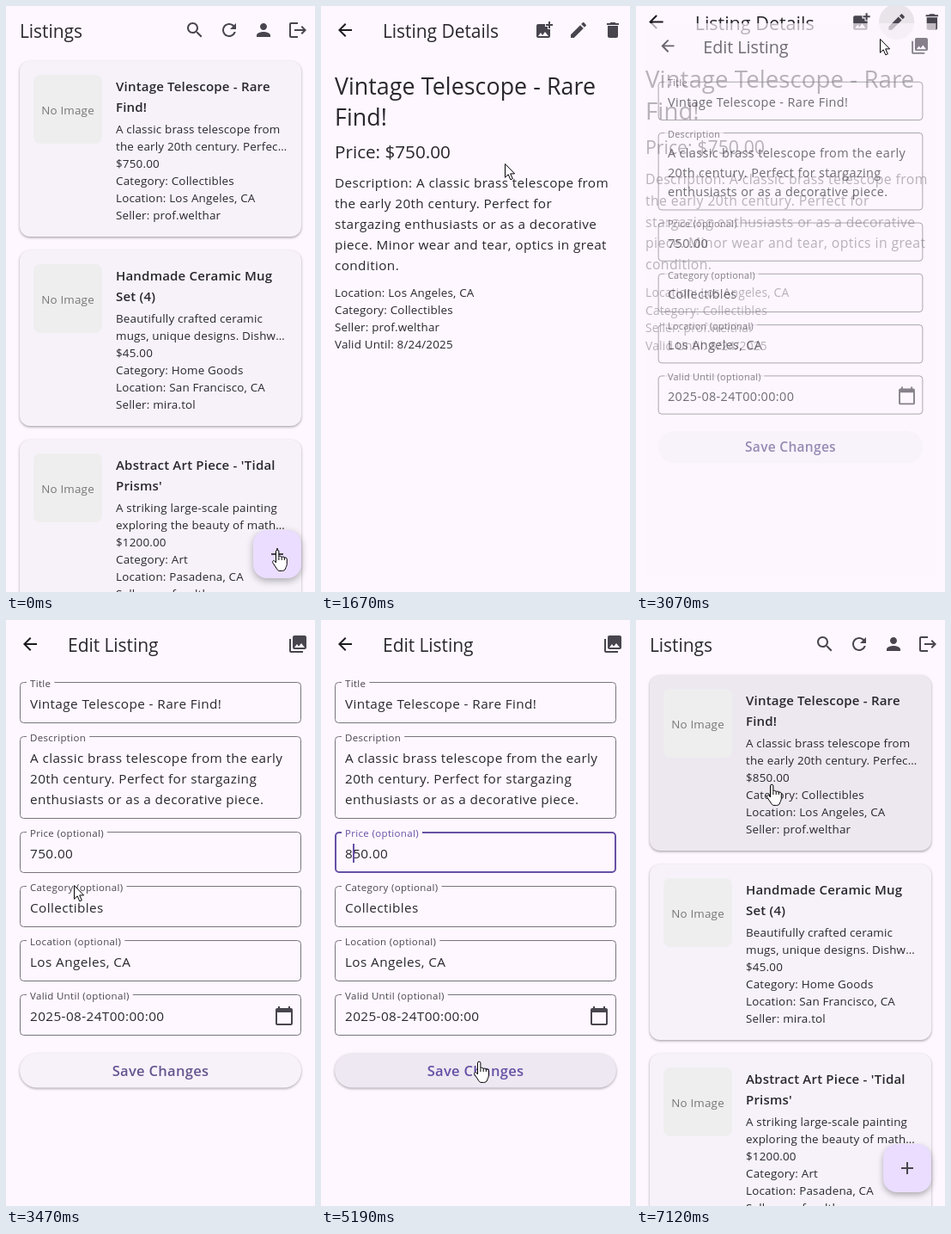
Recreate the animation shown at these times as an HTML page with a canvas. Size 360 by 681 pixels, loop 7390 ms.

```html
<!DOCTYPE html>
<html lang="en">
<head>
<meta charset="utf-8">
<title>Listings app</title>
<style>
html, body { margin: 0; width: 100%; height: 100%; overflow: hidden; background: #fef7ff; }
canvas { display: block; width: 360px; height: 681px; }
</style>
</head>
<body>
<canvas id="stage"></canvas>
<script>
const W = 360, H = 681, LOOP = 7390, STEP = LOOP / 111;
const canvas = document.getElementById('stage');
const ctx = canvas.getContext('2d');
const dpr = window.devicePixelRatio || 1;
canvas.width = W * dpr;
canvas.height = H * dpr;

const C = {
  bg: '#fef7ff', card: '#f7f2fa', hover: '#ede8f0', ink: '#1d1b20', text: '#29272c', icon: '#49454f',
  line: '#79747e', primary: '#6750a4', muted: '#65558f', fab: '#eaddff'
};

// weight, size, letter spacing
const FONT = {
  headline: [400, 26.8, 0.06], title: [400, 21, -0.05], price: [400, 20.7, 0],
  cardTitle: [600, 15, 0.2], large: [400, 15.3, 0.4], body: [400, 13.4, 0.19],
  label: [400, 11.5, 0.34], button: [600, 16.5, 0.3]
};

const ICON = Object.fromEntries(Object.entries({
  search: 'M15.5 14h-.79l-.28-.27C15.41 12.59 16 11.11 16 9.5 16 5.91 13.09 3 9.5 3S3 5.91 3 9.5 5.91 16 9.5 16c1.61 0 3.09-.59 4.23-1.57l.27.28v.79l5 4.99L20.49 19l-4.99-5zm-6 0C7.01 14 5 11.99 5 9.5S7.01 5 9.5 5 14 7.01 14 9.5 11.99 14 9.5 14z',
  refresh: 'M17.65 6.35C16.2 4.9 14.21 4 12 4c-4.42 0-7.99 3.58-7.99 8s3.57 8 7.99 8c3.73 0 6.84-2.55 7.73-6h-2.08c-.82 2.33-3.04 4-5.65 4-3.31 0-6-2.69-6-6s2.69-6 6-6c1.66 0 3.14.69 4.22 1.78L13 11h7V4l-2.35 2.35z',
  person: 'M12 12c2.21 0 4-1.79 4-4s-1.79-4-4-4-4 1.79-4 4 1.79 4 4 4zm0 2c-2.67 0-8 1.34-8 4v2h16v-2c0-2.66-5.33-4-8-4z',
  logout: 'M17 7l-1.41 1.41L18.17 11H8v2h10.17l-2.58 2.58L17 17l5-5zM4 5h8V3H4c-1.1 0-2 .9-2 2v14c0 1.1.9 2 2 2h8v-2H4V5z',
  back: 'M20 11H7.83l5.59-5.59L12 4l-8 8 8 8 1.41-1.41L7.83 13H20v-2z',
  addPhoto: 'M19 7v2.99s-1.99.01-2 0V7h-3s.01-1.99 0-2h3V2h2v3h3v2h-3zm-3 4V8h-3V5H5c-1.1 0-2 .9-2 2v12c0 1.1.9 2 2 2h12c1.1 0 2-.9 2-2v-8h-3zM5 19l3-4 2 3 3-4 4 5H5z',
  edit: 'M3 17.25V21h3.75L17.81 9.94l-3.75-3.75L3 17.25zM20.71 7.04c.39-.39.39-1.02 0-1.41l-2.34-2.34c-.39-.39-1.02-.39-1.41 0l-1.83 1.83 3.75 3.75 1.83-1.83z',
  trash: 'M6 19c0 1.1.9 2 2 2h8c1.1 0 2-.9 2-2V7H6v12zM19 4h-3.5l-1-1h-5l-1 1H5v2h14V4z',
  photos: 'M22 16V4c0-1.1-.9-2-2-2H8c-1.1 0-2 .9-2 2v12c0 1.1.9 2 2 2h12c1.1 0 2-.9 2-2zm-11-4l2.03 2.71L16 11l4 5H8l3-4zM2 6v14c0 1.1.9 2 2 2h14v-2H4V6H2z',
  calendar: 'M20 3h-1V1h-2v2H7V1H5v2H4c-1.1 0-2 .9-2 2v16c0 1.1.9 2 2 2h16c1.1 0 2-.9 2-2V5c0-1.1-.9-2-2-2zm0 18H4V8h16v13z',
  add: 'M19 13h-6v6h-2v-6H5v-2h6V5h2v6h6v2z'
}).map(([name, d]) => [name, new Path2D(d)]));

// Pointer shapes, drawn with the hot spot at the origin
const POINTER = {
  arrow: new Path2D('M.5 .5V16.3l3.7-3.5 2.6 6 2.5-1.1-2.6-5.8H11.6z'),
  hand: new Path2D('M-1.5 15V1.9a1.7 1.7 0 0 1 3.4 0V8.2c.3-1.4 3.2-1.2 3.3.5c.5-1.2 3-.9 3.1.8c.6-.9 3-.6 3 1.3V16.5c0 2-1.3 3.5-1.8 5.5c-.6 1.7-2 2.4-4 2.4H3c-1.8 0-2.7-.8-3.4-2.2L-5 15.3c-1.3-2.1.8-3.5 2.2-2.2z'),
  beam: new Path2D('M-3 0h6M-3 16h6M0 0V16')
};

// time, x, y, pointer shape from here on
const TRACK = [
  [0, 316, 632, 'hand'], [66, 316, 632, 'hand'], [400, 218, 191, 'hand'], [520, 218, 191, 'hand'],
  [670, 214, 184, 'hand'], [870, 214, 184, 'hand'], [940, 214, 183, 'hand'], [1530, 214, 183, 'arrow'],
  [1880, 214, 183, 'arrow'], [2130, 222, 194, 'arrow'], [2600, 291, 29, 'hand'], [2730, 292, 27, 'hand'],
  [3010, 292, 27, 'arrow'], [3460, 79, 308, 'arrow'], [3520, 79, 308, 'beam'], [3930, 37, 264, 'beam'],
  [4800, 37, 264, 'beam'], [5040, 130, 420, 'arrow'], [5190, 184, 513, 'hand'], [5390, 184, 513, 'hand'],
  [5590, 241, 535, 'hand'], [5960, 241, 535, 'hand'], [6330, 146, 196, 'hand'], [6790, 156, 190, 'hand'],
  [6930, 156, 190, 'hand'], [7120, 158, 191, 'hand'], [LOOP, 158, 191, 'hand']
];

const CLICKS = [[1270, 1400], [2800, 2930], [3870, 3960], [5290, 5420]];

const LISTINGS = [
  { title: ['Vintage Telescope - Rare', 'Find!'], text: ['A classic brass telescope from', 'the early 20th century. Perfec…'],
    price: '$750.00', category: 'Collectibles', place: 'Los Angeles, CA', seller: 'prof.welthar' },
  { title: ['Handmade Ceramic Mug', 'Set (4)'], text: ['Beautifully crafted ceramic', 'mugs, unique designs. Dishw…'],
    price: '$45.00', category: 'Home Goods', place: 'San Francisco, CA', seller: 'mira.tol' },
  { title: ["Abstract Art Piece - 'Tidal", "Prisms'"], text: ['A striking large-scale painting', 'exploring the beauty of math…'],
    price: '$1200.00', category: 'Art', place: 'Pasadena, CA', seller: 'prof.welthar' }
];

const clamp = v => Math.max(0, Math.min(1, v));
const ramp = (t, a, b) => clamp((t - a) / (b - a));
const smooth = p => p * p * (3 - 2 * p);
const settle = p => 1 - (1 - p) ** 4;

function setFont(style) {
  const [weight, size, spacing] = FONT[style];
  ctx.font = `${weight} ${size}px "Open Sans", sans-serif`;
  ctx.letterSpacing = spacing + 'px';
}

function text(str, x, y, style, color = C.text, align = 'left') {
  setFont(style);
  ctx.textAlign = align;
  ctx.fillStyle = color;
  ctx.fillText(str, x, y);
}

function lines(rows, x, y, pitch, style) {
  rows.forEach((row, i) => text(row, x, y + i * pitch, style));
}

// Shadows are skipped while a page fades, as they would show through the fill
function box(x, y, w, h, r, color, shadow) {
  ctx.save();
  if (shadow && ctx.globalAlpha === 1) {
    const [alpha, blur, dy] = shadow;
    ctx.shadowColor = `rgba(0,0,0,${alpha})`;
    ctx.shadowBlur = blur * dpr;
    ctx.shadowOffsetY = dy * dpr;
  }
  ctx.fillStyle = color;
  ctx.beginPath();
  ctx.roundRect(x, y, w, h, r);
  ctx.fill();
  ctx.restore();
}

function disc(x, y, r, color) {
  ctx.fillStyle = color;
  ctx.beginPath();
  ctx.arc(x, y, r, 0, 2 * Math.PI);
  ctx.fill();
}

function icon(name, cx, cy, color = C.icon) {
  ctx.save();
  ctx.translate(cx - 12, cy - 12);
  ctx.fillStyle = color;
  ctx.fill(ICON[name]);
  ctx.restore();
}

function pointerAt(t) {
  let i = 0;
  while (i < TRACK.length - 2 && t >= TRACK[i + 1][0]) i++;
  const [t0, x0, y0, shape] = TRACK[i], [t1, x1, y1] = TRACK[i + 1];
  const p = smooth(ramp(t, t0, t1));
  return { x: x0 + (x1 - x0) * p, y: y0 + (y1 - y0) * p, shape };
}

function inside(p, x, y, w, h) {
  return p.x >= x && p.x < x + w && p.y >= y && p.y < y + h;
}

function spinner(ms) {
  const cycle = ms / 1333, part = cycle % 1;
  const head = smooth(clamp(part * 2)), tail = smooth(clamp(part * 2 - 1));
  const start = Math.PI * (-0.5 + tail * 1.5 + (ms / 2222) * 2 + part * 0.5);
  ctx.strokeStyle = C.primary;
  ctx.lineWidth = 4;
  ctx.lineCap = 'square';
  ctx.beginPath();
  ctx.arc(180, 368.5, 18, start, start + Math.max((head - tail) * 1.5 * Math.PI, 0.001));
  ctx.stroke();
  ctx.lineCap = 'butt';
}

function card(item, y, price, hovered) {
  box(16, y, 328, 204, 12, hovered ? C.hover : C.card, [0.36, 3, 1.3]);
  box(32, y + 16, 80, 80, 8, '#eeeeee');
  text('No Image', 72, y + 62, 'body', '#777', 'center');
  lines(item.title, 128, y + 35, 24, 'cardTitle');
  lines([...item.text, price, 'Category: ' + item.category, 'Location: ' + item.place, 'Seller: ' + item.seller],
    128, y + 84, 20, 'body');
}

function listPage(t, pointer) {
  const onFab = inside(pointer, 288, 609, 56, 56);
  const loading = t > 5700 && t < 6180;
  if (!loading) {
    LISTINGS.forEach((item, i) => {
      const y = 64 + 220 * i;
      const price = i === 0 && t > 5700 ? '$850.00' : item.price;
      card(item, y, price, !onFab && inside(pointer, 16, y, 328, 204));
    });
  } else if (t >= 5910) {
    spinner(t - 5925);
  }
  text('Listings', 16, 37, 'title');
  ['search', 'refresh', 'person', 'logout'].forEach((name, i) => icon(name, 220 + 40 * i, 28));
  box(288, 609, 56, 56, 16, C.fab, [0.3, onFab ? 9 : 7, 3]);
  icon('add', 316, 637);
}

function detailsPage(t, pointer) {
  const item = LISTINGS[0];
  if (Math.hypot(pointer.x - 300, pointer.y - 28) < 20) disc(300, 28, 20, '#e9e3ea');
  icon('back', 28, 28, C.ink);
  text('Listing Details', 72, 37, 'title');
  ['addPhoto', 'edit', 'trash'].forEach((name, i) => icon(name, 260 + 40 * i, 28));
  lines(item.title, 16, 102.5, 36, 'headline');
  text('Price: ' + item.price, 16, 177, 'price');
  lines(['Description: A classic brass telescope from', 'the early 20th century. Perfect for',
    'stargazing enthusiasts or as a decorative', 'piece. Minor wear and tear, optics in great', 'condition.'],
    16, 211, 24, 'large');
  lines(['Location: ' + item.place, 'Category: ' + item.category, 'Seller: ' + item.seller, 'Valid Until: 8/24/2025'],
    16, 338, 20, 'body');

  const tip = Math.min(ramp(t, 2600, 2750), 1 - ramp(t, 2795, 2870));
  if (tip > 0) {
    ctx.save();
    ctx.globalAlpha = tip;
    box(262, 53, 77, 24, 4, 'rgba(97,97,97,.9)');
    ctx.globalAlpha = 1;
    text('Edit Listing', 300.5, 70, 'label', '#fffaff', 'center');
    ctx.restore();
  }
}

function field(label, y, rows, focused) {
  const h = 24 + 24 * rows.length;
  const inset = focused ? 1 : 0.5;
  ctx.strokeStyle = focused ? C.primary : C.line;
  ctx.lineWidth = inset * 2;
  ctx.beginPath();
  ctx.roundRect(16 + inset, y + inset, 328 - inset * 2, h - inset * 2, 4);
  ctx.stroke();
  setFont('label');
  ctx.fillStyle = C.bg;
  ctx.fillRect(24, y - 1, ctx.measureText(label).width + 8, 4);
  text(label, 28, y + 6, 'label', focused ? C.primary : C.icon);
  lines(rows, 28, y + 31, 24, 'large');
}

function editPage(t, pointer) {
  const focused = t >= 3920;
  const price = t < 4190 ? '750.00' : t < 4585 ? '50.00' : '850.00';
  icon('back', 28, 28, C.ink);
  text('Edit Listing', 72, 37, 'title');
  icon('photos', 340, 28);
  field('Title', 72, ['Vintage Telescope - Rare Find!']);
  field('Description', 135, ['A classic brass telescope from the early',
    '20th century. Perfect for stargazing', 'enthusiasts or as a decorative piece.']);
  field('Price (optional)', 246, [price], focused);
  field('Category (optional)', 309, ['Collectibles']);
  field('Location (optional)', 372, ['Los Angeles, CA']);
  field('Valid Until (optional)', 435, ['2025-08-24T00:00:00']);
  icon('calendar', 324, 460);
  if (focused) {
    ctx.fillStyle = C.primary;
    ctx.fillRect(price === '50.00' ? 28 : 37, 260, 2, 22);
  }
  const hovered = inside(pointer, 16, 503, 328, 41);
  box(16, 503.5, 328, 40, 20, hovered ? '#ede8f2' : C.card, [0.34, 3, 1.2]);
  text('Save Changes', 180, 529.5, 'button', hovered ? C.primary : C.muted, 'center');
}

function page(draw, t, pointer, scale = 1, alpha = 1) {
  if (alpha <= 0) return;
  ctx.save();
  ctx.globalAlpha = alpha;
  ctx.translate(W / 2, H / 2);
  ctx.scale(scale, scale);
  ctx.translate(-W / 2, -H / 2);
  ctx.fillStyle = C.bg;
  ctx.fillRect(0, 0, W, H);
  draw(t, pointer);
  ctx.restore();
}

function push(from, to, p, t, pointer) {
  const e = settle(p);
  if (p < 1) page(from, t, pointer, 1 + 0.05 * e);
  page(to, t, pointer, 0.85 + 0.15 * e, ramp(p, 0.125, 0.25));
}

function pop(from, to, p, t, pointer) {
  const e = settle(p);
  page(to, t, pointer, 1.1 - 0.1 * e);
  page(from, t, pointer, 1 - 0.1 * e, 1 - ramp(p, 0.0825, 0.2075));
}

function drawPointer({ x, y, shape }) {
  ctx.save();
  ctx.translate(Math.round(x), Math.round(y));
  ctx.lineWidth = 1;
  ctx.lineJoin = 'round';
  ctx.strokeStyle = '#000';
  ctx.fillStyle = '#fff';
  if (shape === 'beam') {
    ctx.translate(0.5, 0.5);
  } else {
    ctx.fill(POINTER[shape]);
  }
  ctx.stroke(POINTER[shape]);
  if (shape === 'hand') {
    ctx.beginPath();
    for (const kx of [1.9, 5.2, 8.3]) {
      ctx.moveTo(kx, 8.5);
      ctx.lineTo(kx, 12);
    }
    ctx.stroke();
  }
  ctx.restore();
}

function render(t) {
  const pointer = pointerAt(t);
  ctx.setTransform(dpr, 0, 0, dpr, 0, 0);
  ctx.fillStyle = C.bg;
  ctx.fillRect(0, 0, W, H);
  if (t < 1370) page(listPage, t, pointer);
  else if (t < 3000) push(listPage, detailsPage, ramp(t, 1370, 1670), t, pointer);
  else if (t < 5740) push(detailsPage, editPage, ramp(t, 3000, 3300), t, pointer);
  else pop(editPage, listPage, ramp(t, 5740, 6040), t, pointer);
  if (CLICKS.some(([a, b]) => t >= a && t < b)) {
    disc(pointer.x - 1.5, pointer.y + 1.5, 11.5, 'rgba(240,230,50,.75)');
  }
  drawPointer(pointer);
}

// The picture advances in even steps of about 15 per second
function tick() {
  const t = performance.now() % LOOP;
  render(Math.floor(t / STEP + 0.15) % 111 * STEP);
  requestAnimationFrame(tick);
}
tick();
</script>
</body>
</html>
```
